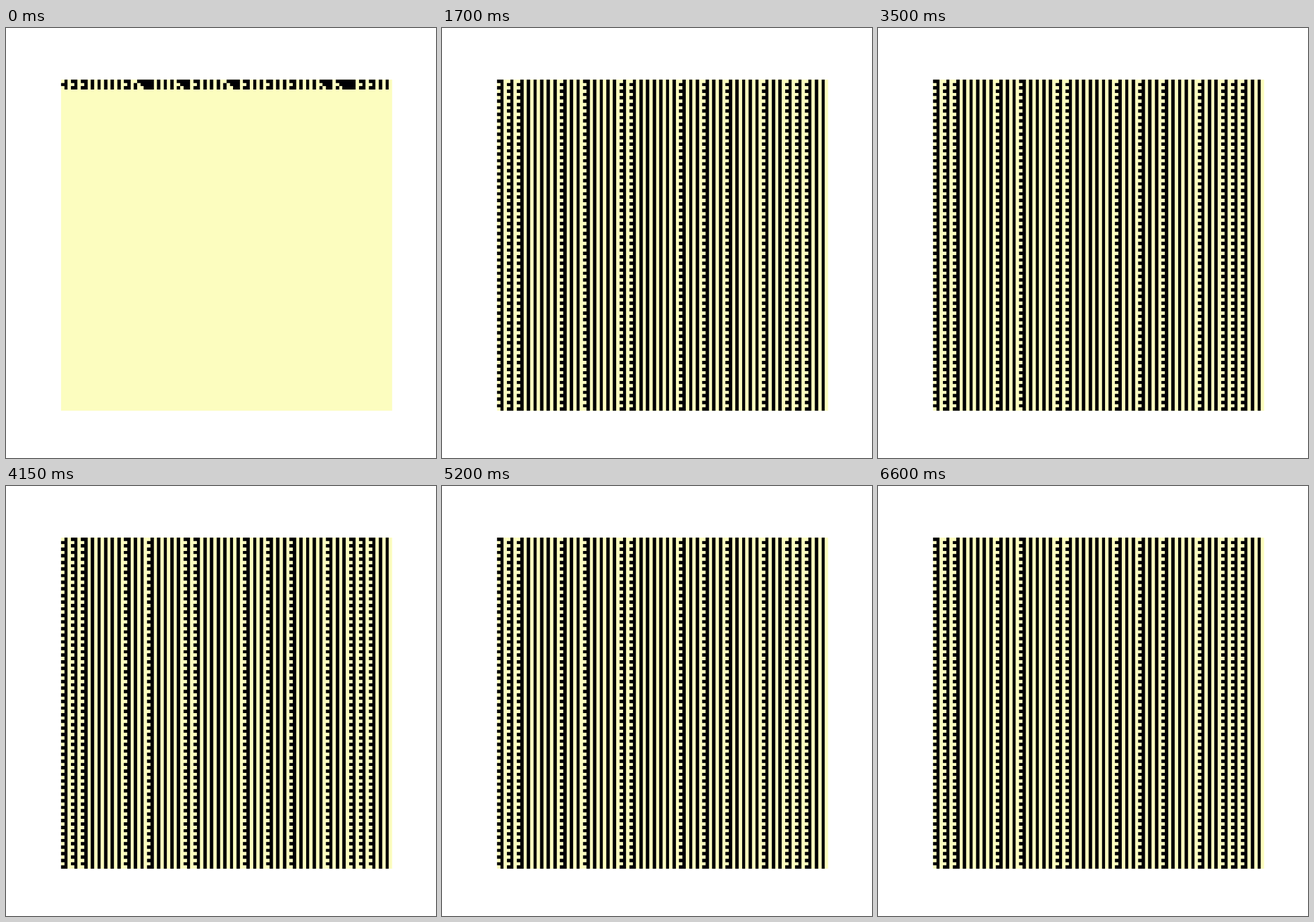
Recreate the animation shown at these times as an HTML page with a canvas. Size 748 px wide and 748 px high, loop 6.65 s.

```html
<!DOCTYPE html>
<html lang="en">
<head>
<meta charset="utf-8">
<title>Cellular automaton</title>
<style>
html, body { margin: 0; width: 100%; height: 100%; overflow: hidden; background: #fff; }
canvas { display: block; }
</style>
</head>
<body>
<canvas id="stage" width="748" height="748"></canvas>
<script>
const ctx = document.getElementById('stage').getContext('2d');
const SIZE = 100, RULE = 198, STEP = 50, FRAMES = 133, ROWS_PER_STEP = 3;

// The plot is laid out on a 1000-pixel grid and scaled down to the stage.
const SCALE = 0.748, LEFT = 128, TOP = 120, PLOT = 770;
const edge = i => Math.ceil(i * PLOT / SIZE - 0.5);

// First generation: every second cell is live, counted anew from each key cell.
// Wide keys also switch on the cell before them; blocks are solid runs.
const wide = [4, 7, 27, 41, 56, 63, 70, 81, 88, 94];
const thin = [1, 20, 34, 91];
const blocks = [[23, 27], [35, 38], [50, 53], [78, 81], [83, 88]];

function firstRow() {
  let key = 1;
  const row = Array.from({ length: SIZE }, (_, x) => {
    if (wide.includes(x) || thin.includes(x)) key = x;
    return (x - key) % 2 === 0 || wide.includes(x + 1) ? 1 : 0;
  });
  for (const [from, to] of blocks) {
    row[from - 1] = 0;
    row.fill(1, from, to + 1);
  }
  return row;
}

const next = row => row.map((c, i) => {
  const l = row[(i + SIZE - 1) % SIZE], r = row[(i + 1) % SIZE];
  return RULE >> (l * 4 + c * 2 + r) & 1;
});

const rows = [firstRow()];
while (rows.length < FRAMES * ROWS_PER_STEP) rows.push(next(rows[rows.length - 1]));

function draw(step) {
  const end = (step + 1) * ROWS_PER_STEP;
  const start = Math.max(0, end - SIZE);
  ctx.setTransform(1, 0, 0, 1, 0, 0);
  ctx.fillStyle = '#fff';
  ctx.fillRect(0, 0, 748, 748);
  ctx.setTransform(SCALE, 0, 0, SCALE, LEFT * SCALE, TOP * SCALE);
  ctx.fillStyle = '#fcfdbf';
  ctx.fillRect(0, 0, PLOT, PLOT);

  // One path for all cells, so neighbours join without seams.
  ctx.beginPath();
  rows.slice(start, end).forEach((row, y) => row.forEach((on, x) => {
    const left = edge(x), top = edge(y);
    if (on) ctx.rect(left, top, edge(x + 1) - left, edge(y + 1) - top);
  }));
  ctx.fillStyle = '#000004';
  ctx.fill();
}

let shown = -1;
const begin = performance.now();
function tick() {
  const step = Math.floor(Math.max(0, performance.now() - begin) / STEP) % FRAMES;
  if (step !== shown) draw(shown = step);
  requestAnimationFrame(tick);
}
tick();
</script>
</body>
</html>
```
